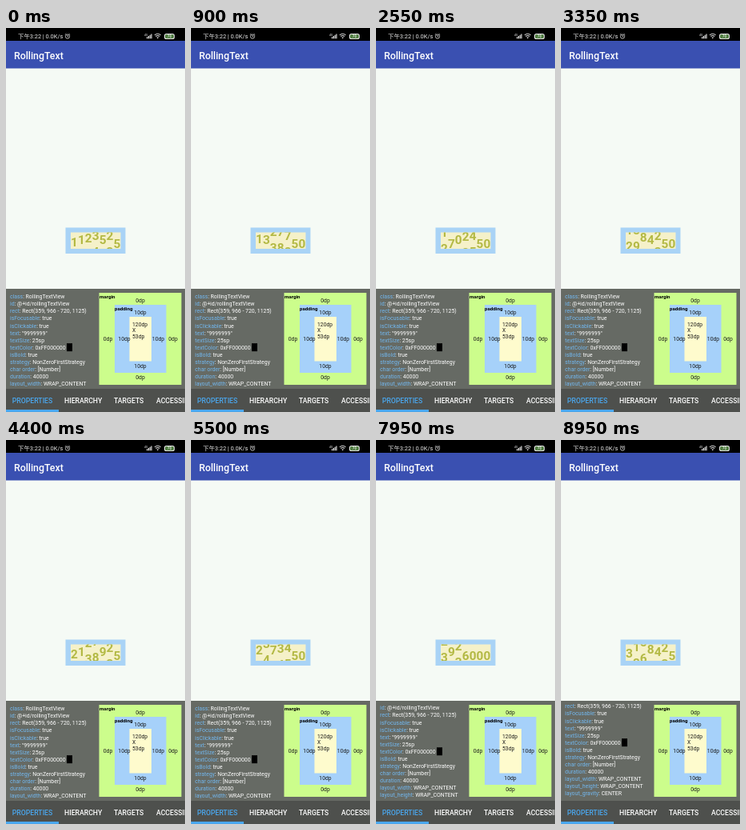
An HTML page that plays this animation: 224 px wide and 480 px high, repeating every 9 s.

```html
<!DOCTYPE html>
<html lang="en">
<head>
<meta charset="utf-8">
<title>Rolling digits</title>
<style>
  html, body { margin: 0; width: 100%; height: 100%; overflow: hidden; background: #f5faf5; }
  svg { display: block; width: 100%; height: 100%; }
  text { font-family: Roboto, "Noto Sans CJK SC", "Noto Sans CJK", sans-serif; white-space: pre; }
  .status { font-size: 7.4px; fill: #e8e8e8; }
  .title { font-size: 12.3px; font-weight: 500; fill: #fff; }
  .digit { font-size: 15.4px; font-weight: 700; fill: #b3b944; text-anchor: middle; }
  .row { font-size: 6.92px; fill: #fff; }
  .key { fill: #72b7ee; }
  .tab { font-size: 8.7px; font-weight: 500; fill: #fff; }
  .dim { font-size: 6.8px; fill: #1c1c1c; }
  .mid { text-anchor: middle; }
  .bold { font-size: 6.2px; font-weight: 700; fill: #000; }
</style>
</head>
<body>
<svg id="stage" viewBox="0 0 224 480">
  <defs>
    <clipPath id="window"><rect x="81" y="255.5" width="62.5" height="20.5"/></clipPath>
    <clipPath id="listArea"><rect x="0" y="330" width="114" height="118"/></clipPath>
  </defs>
  <rect width="224" height="480" fill="#f5faf5"/>
  <rect width="224" height="17" fill="#000"/>
  <rect y="16" width="224" height="34.5" fill="#3a50b1"/>

  <text class="status" x="15" y="13">下午3:22 | 0.0K/s</text>
  <g fill="none" stroke="#ddd" stroke-width=".8">
    <circle cx="77" cy="10.6" r="2.6"/>
    <path d="M77 9v1.8h1.3M73.8 8.5l1.6-1.5M80.2 8.5l-1.6-1.5"/>
    <path d="M186 8.8q3.8-3.2 7.6 0M187.4 10.5q2.4-2 4.8 0" stroke-width="1.1"/>
  </g>
  <g fill="#e4e4e4">
    <path d="M188.5 11.6h2.6l-1.3 1.8z"/>
    <path d="M176 13.2v-2h1.2v2zM177.8 13.2v-3.2h1.2v3.2zM179.6 13.2v-4.4h1.2v4.4zM181.4 13.2v-5.8h1.2v5.8z"/>
    <text x="173" y="9.6" font-size="3.6">4G</text>
    <rect x="198" y="7" width="13" height="7" rx="2.6"/>
  </g>
  <rect x="199" y="8" width="11" height="5" rx="1.8" fill="#4f7d40"/>
  <text class="mid" x="204.5" y="12.4" font-size="5" fill="#fff">70</text>

  <text class="title" x="10" y="38.7">RollingText</text>

  <rect x="74.5" y="249.5" width="75" height="32.5" fill="#a9d3f6"/>
  <rect x="81" y="255.5" width="62.5" height="20.5" fill="#f5f1c9"/>
  <g id="reels" clip-path="url(#window)"></g>

  <rect y="326" width="224" height="154" fill="#666a64"/>
  <g clip-path="url(#listArea)"><g id="list"></g></g>

  <rect x="116.5" y="331" width="103" height="115" fill="#ccfd8c"/>
  <rect x="136" y="346" width="64.5" height="85" fill="#a6d1fa"/>
  <rect x="154.5" y="361" width="27.5" height="55.5" fill="#fefbcd"/>
  <g id="dims"></g>

  <rect y="451" width="224" height="29" fill="#4e504d"/>
  <g id="tabs"></g>
  <rect y="477" width="66" height="3" fill="#4aa7ee"/>
</svg>
<script>
const LOOP = 9000, TICK = 50;
const COLUMNS = 7, PITCH = 8.9, LINE = 20, BASELINE = 275.2;

// [time in ms, counter value]
const COUNTER = [[0, 1123525], [1750, 1520650], [3350, 1884250], [4400, 2127925],
                 [6650, 2630125], [7950, 2926000], [8950, 3158425]];
const SCROLL = { start: 7700, end: 8220, distance: 21 };

const PROPS = [
  ['class', 'RollingTextView'], ['id', '@+id/rollingTextView'],
  ['rect', 'Rect(359, 966 - 720, 1125)'], ['isFocusable', 'true'],
  ['isClickable', 'true'], ['text', '"9999999"'], ['textSize', '25sp'],
  ['textColor', '0xFF000000'], ['isBold', 'true'],
  ['strategy', 'NonZeroFirstStrategy'], ['char order', '[Number]'],
  ['duration', '40000'], ['layout_width', 'WRAP_CONTENT'],
  ['layout_height', 'WRAP_CONTENT'], ['layout_gravity', 'CENTER']
];

const byId = id => document.getElementById(id);

function add(parent, tag, attrs, content = '') {
  const node = document.createElementNS('http://www.w3.org/2000/svg', tag);
  for (const name in attrs) node.setAttribute(name, attrs[name]);
  node.textContent = content;
  return parent.appendChild(node);
}

const label = (parent, cls, x, y, content) => add(parent, 'text', { class: cls, x, y }, content);

const list = byId('list');
PROPS.forEach(([key, value], i) => {
  const y = 338.3 + i * 9.05;
  const row = label(list, 'row', 5, y, '');
  add(row, 'tspan', { class: 'key' }, key);
  add(row, 'tspan', {}, ': ' + value);
  if (key === 'textColor') add(list, 'rect', { x: 76, y: y - 7.5, width: 7, height: 10, fill: '#000' });
});

const dims = byId('dims');
label(dims, 'dim bold', 117, 338, 'margin');
label(dims, 'dim bold', 136, 353, 'padding');
[[168, 343, '0dp'], [168, 357.5, '10dp'], [168, 424.5, '10dp'], [168, 439.3, '0dp'],
 [127.5, 390.8, '0dp'], [148, 390.8, '10dp'], [190.5, 390.8, '10dp'], [209, 390.8, '0dp']]
  .forEach(([x, y, s]) => label(dims, 'dim mid', x, y, s));
['120dp', 'X', '53dp'].forEach((s, i) => label(dims, 'dim', 158, 372.5 + i * 7.7, s));

[[7.7, 'PROPERTIES'], [73, 'HIERARCHY'], [135, 'TARGETS'], [188, 'ACCESSIBILITY']]
  .forEach(([x, s], i) => {
    const tab = label(byId('tabs'), 'tab', x, 469.2, s);
    if (i === 0) tab.style.fill = '#4aa7ee';
  });

// Each reel holds the digits 0-9 plus a second 0 for the wrap.
const reels = Array.from({ length: COLUMNS }, (_, col) => {
  const reel = add(byId('reels'), 'g', {});
  for (let d = 0; d <= 10; d++) {
    label(reel, 'digit', 81 + (col + 0.5) * PITCH, BASELINE + d * LINE, d % 10);
  }
  return reel;
});

function counterAt(t) {
  let i = 1;
  while (i < COUNTER.length - 1 && t > COUNTER[i][0]) i++;
  const [t0, v0] = COUNTER[i - 1], [t1, v1] = COUNTER[i];
  return Math.round((v0 + (v1 - v0) * (t - t0) / (t1 - t0)) / 25) * 25;
}

function scrollAt(t) {
  const p = Math.min(1, Math.max(0, (t - SCROLL.start) / (SCROLL.end - SCROLL.start)));
  return SCROLL.distance * p * p * (3 - 2 * p);
}

const shiftUp = (node, dy) => node.setAttribute('transform', `translate(0 ${-dy})`);

function draw() {
  const t = Math.floor(performance.now() % LOOP / TICK) * TICK;
  const value = counterAt(t);
  reels.forEach((reel, col) => shiftUp(reel, value / 10 ** (COLUMNS - 1 - col) % 10 * LINE));
  shiftUp(list, scrollAt(t));
  requestAnimationFrame(draw);
}
draw();
</script>
</body>
</html>
```
